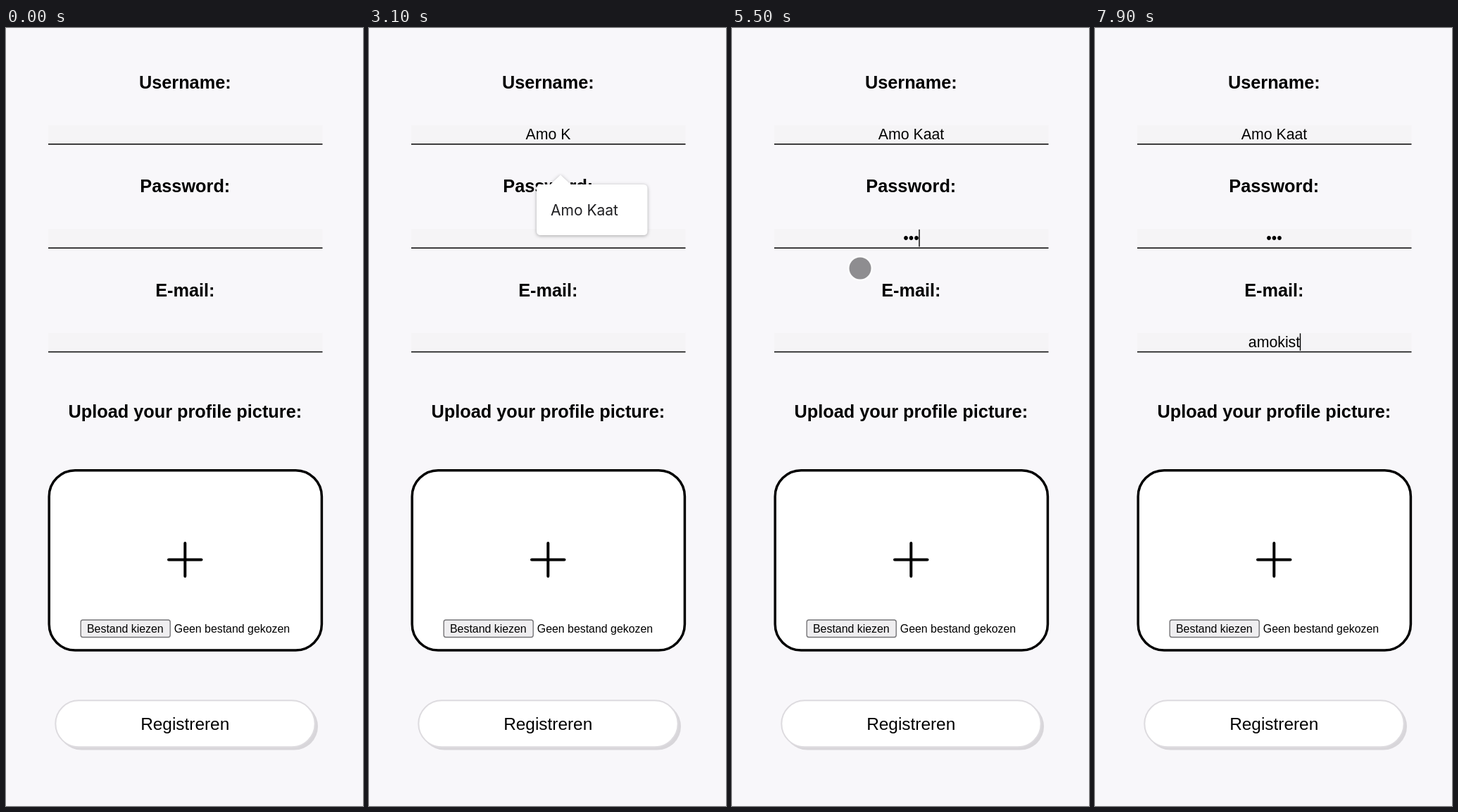
An HTML page that plays this animation: 507 by 1104 pixels, repeating every 8 s.

```html
<!DOCTYPE html>
<html lang="nl">
<head>
<meta charset="utf-8">
<title>Registreren</title>
<style>
  html, body { margin: 0; width: 100%; height: 100%; overflow: hidden; background: #f8f7fa; }
  svg { display: block; width: 100vw; height: 100vh; }
  text { font-family: "Liberation Sans", Arial, sans-serif; fill: #000; }
  .mid { text-anchor: middle; }
  .label { font-size: 25.3px; font-weight: bold; }
  .value { font-size: 21.3px; }
  .file { font-size: 15.9px; }
  .submit { font-size: 24.4px; }
  .popup { filter: drop-shadow(0 1px 2.5px rgba(0, 0, 0, .32)); }
  .popup text { font: 21px Inter, "Open Sans", sans-serif; fill: #1f1f22; }
  .popup .soft { fill: #55555a; }
</style>
</head>
<body>
<svg id="stage" viewBox="0 0 507 1104">
  <g id="form"></g>

  <text class="label mid" x="254.3" y="553.4">Upload your profile picture:</text>
  <rect x="61.2" y="627.7" width="387.2" height="255.3" rx="37" fill="#fff" stroke="#000" stroke-width="3.5"/>
  <path d="M231 754.5H277.5M254.3 731V778" stroke="#000" stroke-width="4" stroke-linecap="round"/>
  <rect x="106.2" y="840" width="127" height="24.5" rx="3" fill="#efeef0" stroke="#767578" stroke-width="1.4"/>
  <text class="file" x="115" y="858">Bestand kiezen</text>
  <text class="file" x="238.8" y="858">Geen bestand gekozen</text>

  <rect x="73.5" y="957.5" width="369.5" height="67" rx="33.5" fill="#d8d6da"/>
  <rect x="70.3" y="954.3" width="368.4" height="66" rx="33" fill="#fff" stroke="#dddbdf" stroke-width="2"/>
  <text class="submit mid" x="254.2" y="995.6">Registreren</text>

  <g id="popups"></g>
  <g id="pointer">
    <circle r="16.7" fill="none" stroke="#fff" stroke-opacity=".65" stroke-width="2.6"/>
    <circle r="15.5" fill="#1c1a1e" fill-opacity=".48"/>
  </g>
</svg>
<script>
const LOOP = 8000, TICK = 100, CENTER = 254.5;
const NAME = "Amo Kaat", FULL_NAME = "Amo Brink Kaat";
const MAIL = "amobrinkkaat@dorfet.nl", TYPED_MAIL = "amokist";
const $ = id => document.getElementById(id);

// Form fields
const fields = ["Username:", "Password:", "E-mail:"].map((label, i) => {
  const y = 165 + i * 147.4;
  $("form").insertAdjacentHTML("beforeend", `<g>
    <text class="label mid" x="254.3" y="${y - 79}">${label}</text>
    <rect x="60" y="${y - 27}" width="389.5" height="27" fill="#f5f4f6"/>
    <rect x="60" y="${y - 1}" width="389.5" height="1.6" fill="#111"/>
    <text class="value mid" x="${CENTER}" y="${y - 7.3}"></text>
    <rect class="caret" y="${y - 26.5}" width="1.4" height="24.5"/></g>`);
  const group = $("form").lastElementChild;
  return { value: group.querySelector(".value"), caret: group.querySelector(".caret") };
});

// Suggestion popups
function popup(x, y, w, h, tip, content) {
  $("popups").insertAdjacentHTML("beforeend", `<g class="popup" transform="translate(${x} ${y})">
    <path fill="#fff" d="M6 0H${tip - 14.5}L${tip} -13.5L${tip + 14.5} 0H${w - 6}q6 0 6 6V${h - 6}q0 6 -6 6H6q-6 0 -6 -6V6q0 -6 6 -6z"/>
    ${content}</g>`);
  return $("popups").lastElementChild;
}
const text = (x, y, s, cls = "") => `<text x="${x}" y="${y}" class="${cls}">${s}</text>`;
const disc = (x, y, r, fill = "#57585c") => `<circle cx="${x}" cy="${y}" r="${r}" fill="${fill}"/>`;
const rule = (y, w) => `<rect y="${y}" width="${w}" height="1.6" fill="#cfced3"/>`;
const globe = disc(33, 54, 11) +
  `<path fill="#fff" d="M25 52l5 5v3l3 2v1q-8-1-8-11zM34 46q8 2 7 11l-2 3-2-1v-4l-6-1v-2l3-1v-2l3-1z"/>`;
const account = globe + text(66, 44, MAIL) + [71, 81, 91].map(x => disc(x, 74.5, 2.2)).join("") +
  rule(108.5, 394) + disc(33, 146.5, 11) + text(66, 154, "Wachtwoorden beheren...", "soft") +
  disc(358, 146.5, 8, "#4285f4");

const popups = {
  login: popup(103, 222, 394.5, 182.5, 34, account),
  names: popup(238, 222, 216, 132, 34, text(20, 44, NAME) + text(20, 104, FULL_NAME)),
  name: popup(238, 222, 157.5, 72, 34, text(20, 44, NAME)),
  password: popup(103, 406, 394.5, 182.5, 34, account),
  mail: popup(202, 591.5, 295.5, 146.5, 34, text(20, 44, MAIL) + rule(72.5, 296) +
    disc(32.5, 110.5, 11) + text(66, 118, "Beheren...", "soft"))
};

// time, typed length per field, field with a lit caret (-1: none), popup
const steps = [
  [0, 0, 0, 0, -1, ""],
  [800, 0, 0, 0, 0, "login"],
  [1300, 0, 0, 0, -1, "login"],
  [1800, 0, 0, 0, 0, "login"],
  [1900, 1, 0, 0, 0, "login"],
  [2100, 2, 0, 0, 0, "login"],
  [2200, 3, 0, 0, 0, "login"],
  [2400, 4, 0, 0, 0, "names"],
  [2600, 5, 0, 0, 0, "name"],
  [3100, 5, 0, 0, -1, "name"],
  [3300, 6, 0, 0, 0, "name"],
  [3500, 7, 0, 0, 0, "name"],
  [3600, 8, 0, 0, 0, ""],
  [4100, 8, 0, 0, -1, ""],
  [4300, 8, 0, 0, 1, "password"],
  [4800, 8, 0, 0, -1, "password"],
  [4900, 8, 1, 0, 1, ""],
  [5100, 8, 2, 0, 1, ""],
  [5300, 8, 3, 0, 1, ""],
  [5800, 8, 3, 0, -1, ""],
  [6100, 8, 3, 0, 2, "mail"],
  [6600, 8, 3, 0, -1, "mail"],
  [7000, 8, 3, 0, 2, "mail"],
  [7500, 8, 3, 2, 2, "mail"],
  [7600, 8, 3, 4, 2, ""],
  [7700, 8, 3, 6, 2, ""],
  [7900, 8, 3, 7, 2, ""]
];

// Pointer strokes: visible from, arrival, visible until, start and end points
const strokes = [
  { from: 100, to: 700, until: 1600, a: [258, 743], b: [298.5, 147.5] },
  { from: 3700, to: 4100, until: 4900, a: [280, 172], b: [182, 298.5] },
  { from: 5500, to: 6000, until: 6600, a: [182, 341], b: [213, 456] },
  { from: 6600, to: 6900, until: 7000, a: [213, 456], b: [258, 758] }
];
const ease = p => p * p * (3 - 2 * p);

function drawPointer(t) {
  const s = strokes.find(s => t >= s.from && t < s.until);
  $("pointer").style.display = s ? "" : "none";
  if (!s) return;
  const p = ease(Math.min(1, (t - s.from) / (s.to - s.from)));
  const [x, y] = s.a.map((v, i) => v + (s.b[i] - v) * p);
  $("pointer").setAttribute("transform", `translate(${x} ${y})`);
}

function drawForm(t) {
  const [, user, pass, mail, lit, open] = steps.findLast(s => s[0] <= t);
  const values = [NAME.slice(0, user).replace(/ /g, "\u00a0"), "•".repeat(pass), TYPED_MAIL.slice(0, mail)];
  fields.forEach(({ value, caret }, i) => {
    value.textContent = values[i];
    caret.style.display = i === lit ? "" : "none";
    const width = values[i] ? value.getComputedTextLength() : 0;
    caret.setAttribute("x", CENTER + width / 2 - .4);
  });
  for (const key in popups) popups[key].style.display = key === open ? "" : "none";
}

let shown = -1;
const start = performance.now();
function frame() {
  const time = (performance.now() - start) % LOOP;
  const t = Math.floor(time / TICK) * TICK;
  if (t !== shown) {
    shown = t;
    drawForm(t);
    drawPointer(t);
  }
  requestAnimationFrame(frame);
}
frame();
</script>
</body>
</html>
```
